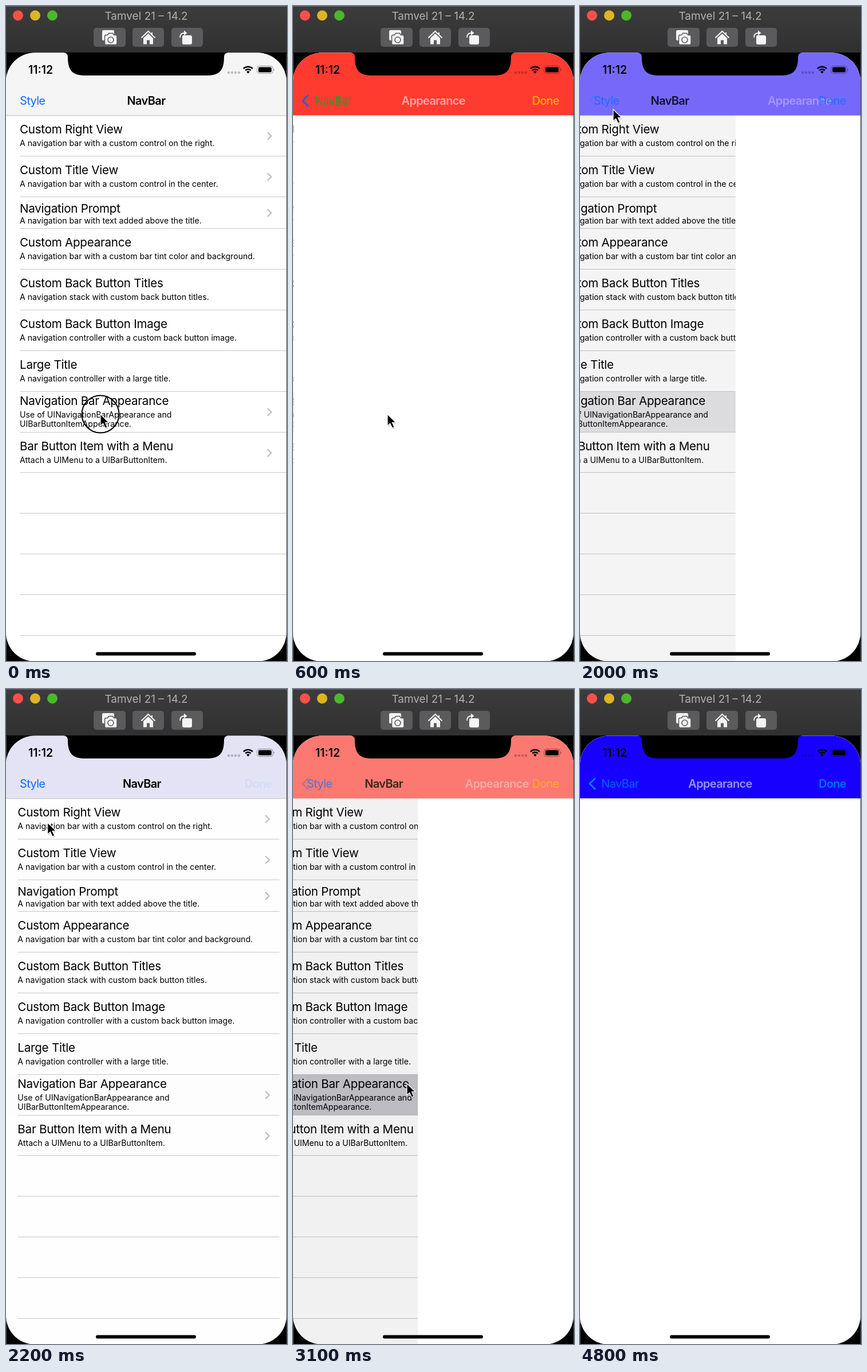
These frames come from a looping animation (491x1141 px, 4.9 s). An HTML page:

```html
<!DOCTYPE html>
<html lang="en">
<head>
<meta charset="utf-8">
<title>Navigation bar appearance</title>
<style>
  html, body { margin: 0; width: 100%; height: 100%; overflow: hidden; background: #000; }
  svg { display: block; font-family: Inter, sans-serif; }
  .nav { font-size: 20px; letter-spacing: -.65px; }
  .bold { font-weight: 600; }
  .mid { text-anchor: middle; }
  .end { text-anchor: end; }
  .row { font-size: 20.6px; letter-spacing: -.25px; }
  .sub { font-size: 14.14px; }
  .chevron { fill: none; stroke: #bdbdc0; stroke-width: 2.2; }
</style>
</head>
<body>
<svg width="491" height="1141" viewBox="0 0 491 1141">
  <defs>
    <linearGradient id="chrome" x2="0" y2="1">
      <stop stop-color="#3d3c3d"/><stop offset="1" stop-color="#303031"/>
    </linearGradient>
    <clipPath id="screen"><rect y="81.600" width="490" height="1060" rx="50"/></clipPath>
    <path id="arrowhead" d="M0 0V20.500l4.600-4.300 3.800 8 3.700-1.600-3.700-7.900h6.400z"/>
  </defs>

  <rect width="491" height="82" fill="url(#chrome)"/>
  <path d="M0 .5H491" stroke="#686768"/>
  <circle cx="21" cy="16.500" r="9" fill="#ff5048"/>
  <circle cx="51" cy="16.500" r="9" fill="#dfb424"/>
  <circle cx="81" cy="16.500" r="9" fill="#4ab82a"/>
  <text class="mid" x="245" y="24" font-size="19" fill="#b1b0b1">Tamvel 21 – 14.2</text>
  <g fill="#5b5a5c">
    <rect x="153" y="38" width="56" height="33" rx="5"/>
    <rect x="221" y="38" width="55" height="33" rx="5"/>
    <rect x="289" y="38" width="55" height="33" rx="5"/>
  </g>
  <g fill="#f4f4f4">
    <rect x="168" y="42" width="21" height="18" rx="2.500"/>
    <path d="M172.500 53q0-2.500 2.500-2.500h2.500l2-3h7l2 3h3q2.500 0 2.500 2.500v12q0 2.500-2.500 2.500h-16.500q-2.500 0-2.500-2.500z" stroke="#5b5a5c" stroke-width="1.500"/>
    <circle cx="183" cy="59" r="5" fill="none" stroke="#5b5a5c" stroke-width="1.600"/>
    <path d="M240 56l8.500-8 8.500 8v10.500h-6v-7h-5v7h-6z"/>
    <path d="M236.500 55.500L248.500 44l12 11.500M255 46v5" fill="none" stroke="#f4f4f4" stroke-width="2"/>
    <rect x="308" y="51" width="17" height="16" rx="3"/>
    <path d="M304 55q0-8 8-8" fill="none" stroke="#f4f4f4" stroke-width="1.800"/>
    <path d="M311 42.500l5.500 4.500-5.500 4.500z"/>
  </g>

  <rect y="81" width="491" height="1060"/>
  <path d="M.5 82V1141M490.500 82V1141" stroke="#4a4a4a"/>
  <g clip-path="url(#screen)">
    <rect y="81" width="491" height="1060" fill="#fff"/>
    <g id="list"></g>
    <rect id="dim" y="190" width="491" height="951"/>
    <rect id="page" y="190" width="491" height="951" fill="#fff"/>

    <rect y="81" width="491" height="109.500" fill="#f5f5f5"/>
    <path id="hairline" d="M0 190.800H491" stroke="#b9b9bb"/>
    <rect id="bar" y="81" width="491" height="109.500"/>
    <g class="nav">
      <text id="style" x="24" y="172" fill="#0a6cff">Style</text>
      <path id="arrow" d="M27 155l-10 10 10 10" fill="none" stroke-width="2.800"/>
      <text id="back" class="mid" y="172">NavBar</text>
      <text id="title" class="mid bold" y="172">NavBar</text>
      <text id="heading" class="mid bold" y="172" fill="#fff">Appearance</text>
      <text id="done" class="end" x="465" y="172">Done</text>
    </g>
    <text class="bold" x="39" y="118" font-size="19.500">11:12</text>
    <g opacity=".22">
      <circle cx="389" cy="116" r="2.300"/><circle cx="395" cy="116" r="2.300"/>
      <circle cx="401" cy="116" r="2.300"/><circle cx="407" cy="116" r="2.300"/>
    </g>
    <path d="M415 109a11.300 11.300 0 0 1 16 0M418.200 112.200a6.800 6.800 0 0 1 9.600 0"
      fill="none" stroke="#000" stroke-width="2.600"/>
    <path d="M420.200 114.600a4 4 0 0 1 5.600 0l-2.800 3.200z"/>
    <rect x="438.900" y="104.600" width="27.400" height="13" rx="4" fill="none" stroke="#000" stroke-opacity=".4"/>
    <rect x="441" y="106.600" width="23" height="9" rx="2.300"/>
    <path d="M467.800 109q2 2 0 4z" opacity=".5"/>
    <rect x="157" y="1125.600" width="175" height="5.900" rx="2.900"/>
  </g>
  <path d="M101 81q7 1 7 8c0 23 8 32 30 32H351c22 0 30-9 30-32q0-7 7-8z"/>

  <g id="pointer">
    <circle id="press" r="32.500" fill="none" stroke="#000" stroke-width="2"/>
    <use href="#arrowhead" transform="translate(1 2)" opacity=".2"/>
    <use href="#arrowhead" stroke="#fff" stroke-width="1.200"/>
  </g>
</svg>
<script>
const LOOP = 4900, STEP = 100, WIDTH = 490;
const PUSH = 100, POP = 1900, PUSH_AGAIN = 3000, RECOLOR = 700;
const $ = id => document.getElementById(id);
const set = (id, attrs) => {
  for (const name in attrs) $(id).setAttribute(name, attrs[name]);
};

// title, subtitle, title baseline, chevron centre
const rows = [
  ['Custom Right View', 'A navigation bar with a custom control on the right.', 222, 226],
  ['Custom Title View', 'A navigation bar with a custom control in the center.', 293, 297],
  ['Navigation Prompt', 'A navigation bar with text added above the title.', 360, 360],
  ['Custom Appearance', 'A navigation bar with a custom bar tint color and background.', 419],
  ['Custom Back Button Titles', 'A navigation stack with custom back button titles.', 490],
  ['Custom Back Button Image', 'A navigation controller with a custom back button image.', 561],
  ['Large Title', 'A navigation controller with a large title.', 632],
  ['Navigation Bar Appearance', 'Use of UINavigationBarAppearance and|UIBarButtonItemAppearance.', 695, 707],
  ['Bar Button Item with a Menu', 'Attach a UIMenu to a UIBarButtonItem.', 774, 778]
];
const separators = [261.5, 332.5];
for (let i = 0; i < 11; i++) separators.push(Math.round(388 + i * 70.9) - .5);

$('list').innerHTML =
  '<rect id="highlight" y="672" width="491" height="70" fill="#c7c7cc"/>' +
  separators.map(y => `<path d="M24 ${y}H491" stroke="#c8c8ca"/>`).join('') +
  rows.map(([title, sub, y, chevron]) => {
    const gap = title === 'Navigation Prompt' ? 19 : 22;
    const lines = sub.split('|').map((line, i) =>
      `<text class="sub" x="24" y="${y + gap + i * 16}">${line}</text>`).join('');
    const mark = chevron ? `<path class="chevron" d="M457 ${chevron - 6}l6.500 6.500-6.500 6.500"/>` : '';
    return `<text class="row" x="24" y="${y}">${title}</text>${lines}${mark}`;
  }).join('');

const red = { bar: '#ff3b30', arrow: '#1a63e0', back: '#2c9a32', done: '#ffc400', weight: 400 };
const blue = { bar: '#1800ff', arrow: '#0080ff', back: '#0064f0', done: '#0070f5', weight: 600 };

// time, x, y
const track = [
  [0, 165, 711], [700, 165, 711], [1200, 97, 254], [1300, 89, 223], [1800, 58, 180],
  [2100, 58, 180], [2600, 199, 687], [3100, 199, 687], [3800, 212, 652], [LOOP, 212, 652]
];
function pointerAt(t) {
  const i = track.findIndex(key => key[0] > t);
  const [t0, x0, y0] = track[i - 1], [t1, x1, y1] = track[i];
  const u = (t - t0) / (t1 - t0), e = u * u * (3 - 2 * u);
  return [x0 + (x1 - x0) * e, y0 + (y1 - y0) * e];
}

// Critically damped spring from 0 to 1
function spring(ms) {
  const s = Math.max(0, ms) * .0186;
  return ms > 600 ? 1 : 1 - (1 + s) * Math.exp(-s);
}

function draw(t) {
  const popping = t >= POP && t < PUSH_AGAIN;
  const shown = t < POP ? spring(t - PUSH) : popping ? 1 - spring(t - POP) : spring(t - PUSH_AGAIN);
  const isRed = t < PUSH + RECOLOR || (t >= PUSH_AGAIN && t < PUSH_AGAIN + RECOLOR);
  const look = isRed ? red : blue;
  const fade = shown ** 2, tint = shown ** .7;
  const titleX = 245 - 175 * shown ** (popping ? .85 : 1.2);

  set('list', { transform: `translate(${-.3 * WIDTH * shown})` });
  const pressed = (t >= PUSH && t < POP) || t >= PUSH_AGAIN;
  set('highlight', { opacity: popping ? shown : +pressed });
  set('dim', { opacity: .1 * shown });
  set('page', { x: WIDTH * (1 - shown) });
  set('hairline', { opacity: 1 - shown });
  set('bar', { fill: look.bar, opacity: tint });
  set('style', { opacity: 1 - fade });
  set('arrow', { stroke: look.arrow, opacity: fade });
  set('back', { x: titleX, fill: look.back, opacity: fade });
  set('title', { x: titleX, opacity: 1 - fade });
  set('heading', { x: 245 + 250 * (1 - shown), opacity: .56 * tint });
  set('done', { fill: look.done, 'font-weight': look.weight, opacity: tint });

  const [x, y] = pointerAt(t);
  const down = t < PUSH || (t >= POP - 100 && t < POP) || (t >= 2700 && t < PUSH_AGAIN);
  set('pointer', { transform: `translate(${x} ${y})`, opacity: +(t < 4000) });
  set('press', { opacity: +down });
}

function tick() {
  const t = performance.now() % LOOP;
  draw(Math.floor(t / STEP) * STEP);
  requestAnimationFrame(tick);
}
tick();
</script>
</body>
</html>
```
